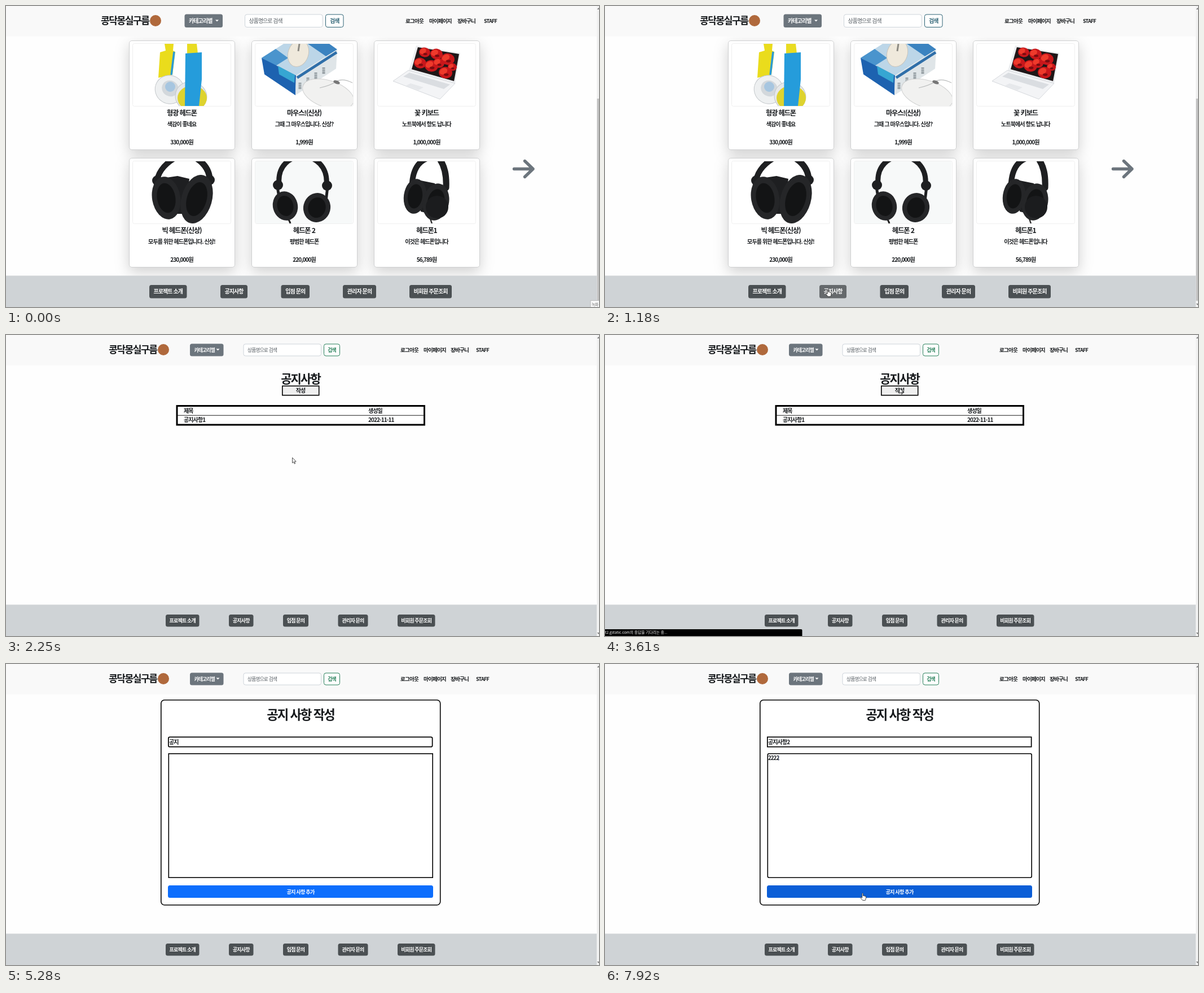
Write an HTML page that moves like this. It is 1051x533 px and loops after 8 s.

```html
<!DOCTYPE html>
<html lang="ko">
<head>
<meta charset="utf-8">
<title>공지사항</title>
<style>
  html, body { margin: 0; width: 100%; height: 100%; overflow: hidden; background: #fff; }
  svg { display: block; width: 100%; height: 100%; }
  text { font-family: "Noto Sans CJK KR", "Noto Sans CJK", sans-serif; letter-spacing: -.09em; white-space: pre; }
  .card { filter: drop-shadow(0 8px 12px rgba(0, 0, 0, .18)); }
</style>
</head>
<body>
<svg id="stage" viewBox="0 0 1051 533"></svg>
<script>
const LOOP = 8000;
const INK = '#16191c';

const rect = (x, y, x2, y2, fill, attrs = '') =>
  `<rect x="${x}" y="${y}" width="${x2 - x}" height="${y2 - y}" fill="${fill}" ${attrs}/>`;
const frame = (x, y, x2, y2, color, width, radius = 0, fill = '#fff', attrs = '') =>
  rect(x + width / 2, y + width / 2, x2 - width / 2, y2 - width / 2, fill,
    `stroke="${color}" stroke-width="${width}" rx="${radius}" ${attrs}`);
// cy is the middle of the glyphs
const label = (x, cy, size, str, { fill = INK, weight = 700, anchor = 'start', attrs = '' } = {}) =>
  `<text x="${x}" y="${cy + size * .37}" font-size="${size}" fill="${fill}" font-weight="${weight}" text-anchor="${anchor}" ${attrs}>${str}</text>`;
const centered = (x, cy, size, str, opts = {}) => label(x, cy, size, str, { anchor: 'middle', ...opts });
const poly = (points, fill, attrs = '') => `<polygon points="${points}" fill="${fill}" ${attrs}/>`;
const oval = (cx, cy, rx, ry, turn, fill, attrs = '') =>
  `<ellipse cx="${cx}" cy="${cy}" rx="${rx}" ry="${ry}" transform="rotate(${turn} ${cx} ${cy})" fill="${fill}" ${attrs}/>`;
const line = (d, color, width, attrs = '') =>
  `<path d="${d}" fill="none" stroke="${color}" stroke-width="${width}" ${attrs}/>`;
const group = (id, content, attrs = '') => `<g id="${id}" ${attrs}>${content}</g>`;

function header({ logoX, menu, field, button, nav, size, top, bottom, accent }) {
  const mid = 26.5;
  const links = ['로그아웃', '마이페이지', '장바구니', 'STAFF'];
  return rect(0, 0, 1047, 54, '#f9f9f9')
    + label(logoX, 26, 17.2, '콩닥몽실구름')
    + `<circle cx="${logoX + 97}" cy="26" r="10" fill="#b0693c"/>`
    + rect(menu[0], top, menu[1], bottom, '#6c757d', 'rx="3.5"')
    + label(menu[0] + 7.5, mid, size, '카테고리별', { fill: '#fff' })
    + poly(`${menu[1] - 13},24.5 ${menu[1] - 7},24.5 ${menu[1] - 10},27.5`, '#fff')
    + frame(field[0], top, field[1], bottom, '#ced4da', 1, 3.5)
    + label(field[0] + 7.5, mid, size - .1, '상품명으로 검색', { fill: '#555c62', weight: 400 })
    + frame(button[0], top, button[1], bottom, accent, 1, 3.5)
    + centered((button[0] + button[1]) / 2, mid, size, '검색', { fill: accent })
    + links.map((s, i) => label(nav[i], mid, i < 3 ? 9.6 : 9, s)).join('');
}

function footer(spans, top, bottom, size) {
  const names = ['프로젝트 소개', '공지사항', '입점 문의', '관리자 문의', '비회원 주문조회'];
  return rect(0, 477.5, 1047, 533, '#cfd3d6') + names.map((s, i) => {
    const [x, x2] = spans[i];
    return rect(x, top, x2, bottom, '#4b5053', `rx="3.5" class="link${i}"`)
      + centered((x + x2) / 2, (top + bottom) / 2, size, s, { fill: '#fff' });
  }).join('');
}

const band = (d, width = 8) => line(d, '#1e1f21', width, 'stroke-linecap="round"');
const cup = (x, y, rx, ry, turn) =>
  oval(x, y, rx, ry, turn, '#252628') + oval(x, y, rx * .65, ry * .7, turn, '#131415');
const joint = (x, y, r) => `<circle cx="${x}" cy="${y}" r="${r}" fill="#1e1f21"/>`;
const blossom = ([x, y, r]) => oval(x, y, r, r * .85, 10, '#c8171b')
  + oval(x - r * .3, y - r * .2, r * .6, r * .45, -30, '#ee3a2b') + oval(x + r * .1, y + r * .3, r * .35, r * .2, 0, '#7c0c10');

// Product pictures, drawn in stage coordinates
const pictures = [
  poly('281,67 297,67 296,79 300,81 295,122 270,127 273,82 283,79', '#eadc1c')
    + line('M298 81L293 122', '#2a9bd8', 3.5)
    + oval(290, 148, 26, 25, 30, '#eef0f1', 'stroke="#c3c7ca"')
    + oval(291, 146, 15, 14, 30, '#d3d8dc') + oval(291, 143, 9, 9, 0, '#a7c6e0')
    + poly('321,67 338,67 340,84 321,84', '#e9dc22')
    + oval(328, 160, 28, 26, 15, '#e6e8ea', 'stroke="#c3c7ca"') + oval(330, 163, 26, 22, 0, '#ded32e')
    + poly('318,84 347,82 347,130 342,177 317,177', '#259cdb'),
  poly('453,92 492,67 573,67 587,77 514,123', '#bcd6e8')
    + poly('453,92 478,76 500,92 478,106', '#4a94cd') + poly('535,67 573,67 587,77 567,89', '#3b83c0')
    + poly('453,92 514,123 513,158 458,121', '#1d62b0')
    + poly('482,106 512,122 511,136 484,121', '#36a6d2')
    + poly('514,123 587,77 585,111 513,158', '#dfe5e8')
    + line('M516 127L586 82', '#2f6fa9', 5)
    + [0, 1, 2, 3].map(i => line(`M${521 + i * 14} ${136 - i * 9}v11`, '#6b767d', 5, 'stroke-dasharray="1.200 1.200"')).join('')
    + oval(518, 84, 18, 24, 18, '#efe9dc', 'stroke="#c9c4ba"') + line('M520 67L518 80', '#8d8b84', 3)
    + oval(571, 156, 47, 24, 18, '#f1f1f0', 'stroke="#cfd0d0"')
    + line('M556 145Q574 141 585 134T614 136', '#b9bbbb', 1.2) + oval(586, 135, 6, 3, 20, '#777'),
  poly('727,70 805,83 796,137 714,114', '#eceef0')
    + poly('730,73 803,85 794,133 719,112', '#1f1718')
    + [[742, 82, 10], [763, 85, 11], [783, 94, 12], [734, 101, 11], [754, 106, 12], [779, 118, 12], [767, 101, 10], [791, 108, 8]]
      .map(blossom).join('')
    + poly('713,114 796,137 769,165 686,133', '#f3f4f6', 'stroke="#d5d8dc"')
    + poly('715,118 787,139 776,147 704,125', '#dadde1') + poly('717,137 740,144 731,149 709,141', '#e6e8eb'),
  band('M268 312C268 298 278 282 298 270', 10) + band('M338 270C353 280 362 294 361 312', 11)
    + joint(268, 309, 9) + joint(361, 308, 9)
    + poly('284,304 304,301 325,306 318,368 296,368', '#1e1f21')
    + cup(284, 340, 25, 38, -10) + cup(338, 342, 27, 44, 16),
  rect(442, 274, 614, 386, '#f7f9f9') + band('M484 315C478 250 574 250 568 318', 9)
    + joint(482, 317, 9) + joint(569, 318, 9)
    + band('M481 320L485 345M570 320L567 345', 5) + line('M497 375Q503 379 504 386', '#222', 3)
    + cup(495, 354, 22, 26, -14) + cup(551, 357, 24, 26, 14),
  band('M720 312C722 290 730 276 746 270', 10) + band('M768 270C778 284 781 300 780 322', 11)
    + line('M738 355Q752 372 755 386', '#333', 2.5)
    + poly('730,308 760,314 760,370 735,364', '#1e1f21')
    + cup(725, 337, 20, 31, 8) + cup(762, 347, 23, 33, 12) + oval(764, 356, 20, 20, 0, '#1b1c1e'),
];

const products = [
  ['형광 헤드폰', '색감이 좋네요', '330,000원'],
  ['마우스!(신상)', '그때 그 마우스입니다. 신상?', '1,999원'],
  ['꽃 키보드', '노트북에서 향도 납니다', '1,000,000원'],
  ['빅 헤드폰(신상)', '모두를 위한 헤드폰입니다. 신상!', '230,000원'],
  ['헤드폰 2', '평범한 헤드폰', '220,000원'],
  ['헤드폰1', '이것은 헤드폰입니다', '56,789원'],
];

function card([title, note, price], i) {
  const x = 218 + i % 3 * 217, y = i < 3 ? 61 : 269, mid = x + 93.5;
  return frame(x, y, x + 188, y + 194, '#cfd0d1', 1, 4.5, '#fff', 'class="card"')
    + `<clipPath id="clip${i}">${rect(x + 7, y + 6, x + 180, y + 116, '#fff', 'rx="3"')}</clipPath>`
    + `<g clip-path="url(#clip${i})">${pictures[i]}</g>`
    + frame(x + 6, y + 5, x + 181, y + 117, '#efefef', 1, 3, 'none')
    + centered(mid, y + 128.5, 12.2, title)
    + centered(mid, y + 148, 10, note)
    + centered(mid, y + 180.5, 10, price);
}

const shop = group('shop',
  products.map(card).join('')
  + line('M900.500 288.500H934M919.500 274.500L934 288.500L919.500 302.500', '#6c757d', 5.4, 'stroke-linecap="round" stroke-linejoin="round"')
  + header({ logoX: 168, menu: [316.5, 384], field: [423, 561.5], button: [566, 598.5],
    nav: [708, 750, 800, 847], size: 10, top: 14.5, bottom: 38, accent: '#2c6274' })
  + footer([[254, 320.5], [380, 428], [487.5, 538], [597, 656], [715, 790]], 494, 517.5, 10)
  + rect(1047.500, 164, 1051, 522, '#c1c1c1'));

const site = group('site',
  header({ logoX: 182, menu: [326, 385.5], field: [420.5, 559], button: [563, 592],
    nav: [699, 740, 788, 833], size: 8.8, top: 15.5, bottom: 37.5, accent: '#27805a' })
  + footer([[283, 342.5], [395, 438.5], [491, 536], [588.5, 641.5], [694, 760.5]], 495, 516.5, 9));

const list = group('list',
  centered(522, 77, 21, '공지사항')
  + frame(489, 89.5, 555.5, 107.5, '#000', 1.6, 0, '#efefef')
  + centered(522, 98.5, 10, '작성')
  + frame(301.5, 124, 743, 160.5, '#000', 3)
  + line('M304 142.300H741', '#222', 1)
  + label(315, 134, 10, '제목') + label(642, 134, 10, '생성일')
  + label(315, 150, 10, '공지사항1') + label(642, 150, 10, '2022-11-11'));

const form = group('form',
  frame(274, 63, 770.5, 427.5, '#000', 1.6, 6)
  + centered(522, 90, 22.3, '공지 사항 작성')
  + frame(287, 128.5, 756.5, 147.5, '#000', 1.7, 0, '#fff', 'id="titleBox"')
  + label(289, 138, 10, '', { attrs: 'id="titleText"' })
  + frame(287.5, 158, 757, 379, '#000', 1.6, 0, '#fff', 'id="bodyBox"')
  + label(289, 166.5, 9.6, '', { attrs: 'id="bodyText"' })
  + rect(0, 162, .8, 171, '#4a5a80', 'id="caret"')
  + rect(287, 392, 757, 414, '#0d6efd', 'id="submit" rx="3.5"')
  + centered(522, 403.5, 9.2, '공지 사항 추가', { fill: '#fff' }));

const scrollbar = rect(1047, 0, 1051, 533, '#f1f1f1')
  + poly('1047.5,6 1051,3 1051,6', '#777') + poly('1047.5,527 1051,527 1051,530', '#777');

const status = group('status', rect(-3, 521, 349.5, 536, '#000', 'rx="2"'))
  + label(0, 527, 6.7, 't2.gstatic.com의 응답을 기다리는 중...',
    { fill: '#fff', weight: 400, attrs: 'id="statusText" style="letter-spacing:0"' });

const hint = group('hint', frame(1035.5, 521, 1056, 536, '#bbb', 1, 0, '#f8f8f8')
  + label(1038, 528.5, 7, '녹화', { fill: '#777', weight: 400 }));

const outline = (id, d) =>
  `<path id="${id}" d="${d}" fill="#fff" stroke="#222" stroke-width=".8" stroke-linejoin="round"/>`;
const pointer = group('pointer',
  outline('arrow', 'M0 0V9.500L2.200 7.500L3.700 11L5.100 10.400L3.600 7H6.600Z')
  + outline('hand', 'M1.200 1Q2 -.3 2.900 1V5Q4 4.200 4.700 5.300Q5.800 4.700 6.400 5.800Q7.900 5.300 8 7V9.500L6.800 13H2.200L-1.700 8.500Q-1.500 6.800 .3 7.900L1.200 8.500Z')
  + line('M-2.500 -4H2.500M0 -4V4M-2.500 4H2.500', '#444', 1, 'id="beam"'));

document.getElementById('stage').innerHTML = rect(0, 0, 1051, 533, '#fefefe')
  + scrollbar + shop + site + list + form + status + hint + pointer;

const el = id => document.getElementById(id);
const show = (id, on) => el(id).setAttribute('display', on ? 'inline' : 'none');

// time, x, y, shape until the next key
const pointerKeys = [
  [0, 1042, 526, 'none'], [70, 1042, 526, 'arrow'], [350, 800, 472, 'arrow'], [550, 600, 460, 'arrow'],
  [700, 440, 474, 'arrow'], [830, 363, 500, 'arrow'], [970, 363, 500, 'arrow'], [1040, 381, 501, 'hand'],
  [1180, 393, 501.5, 'hand'], [1770, 393, 501.5, 'arrow'], [2110, 393, 501.5, 'arrow'], [2250, 507.5, 217.5, 'arrow'],
  [2500, 523, 120, 'arrow'], [2860, 522, 86, 'arrow'], [2930, 522, 86, 'arrow'], [3280, 522, 94, 'arrow'],
  [3680, 522, 94, 'arrow'], [4080, 503, 126, 'beam'], [4150, 500.5, 130.5, 'beam'], [4290, 520, 138, 'beam'],
  [4360, 520, 138, 'none'], [6800, 596.5, 115, 'arrow'], [6880, 596.5, 115, 'arrow'], [7010, 500, 160, 'beam'],
  [7150, 430, 215, 'beam'], [7360, 430, 215, 'none'], [7640, 440, 230, 'beam'], [7780, 449, 360, 'arrow'],
  [7850, 452, 394, 'hand'], [7920, 454.5, 405.5, 'hand'], [LOOP, 454.5, 405.5, 'hand'],
];
const titleKeys = [[0, ''], [4490, 'ㄱ'], [4890, '고'], [5010, '공'], [5150, '공ㅈ'], [5280, '공지'], [5610, '공지ㅅ'],
  [5810, '공지사'], [5910, '공지사하'], [6010, '공지사항'], [6280, '공지사항2']];

const lastKey = (keys, t) => keys.findLastIndex(key => key[0] <= t);

function placePointer(t) {
  const i = Math.min(lastKey(pointerKeys, t), pointerKeys.length - 2);
  const [t0, x0, y0, shape] = pointerKeys[i], [t1, x1, y1] = pointerKeys[i + 1];
  const k = (t - t0) / (t1 - t0);
  el('pointer').setAttribute('transform', `translate(${x0 + (x1 - x0) * k} ${y0 + (y1 - y0) * k})`);
  for (const name of ['arrow', 'hand', 'beam']) show(name, name === shape);
}

function render(t) {
  const onShop = t < 1770, onForm = t >= 3680, inBody = t >= 7220;
  show('shop', onShop);
  show('site', !onShop);
  show('list', !onShop && !onForm);
  show('form', onForm);
  show('hint', t < 70);
  document.querySelector('#shop .link1').setAttribute('fill', t >= 1040 ? '#65696c' : '#4b5053');

  const waiting = t >= 3210 && t < 4220;
  show('status', waiting);
  show('statusText', waiting);
  el('status').setAttribute('opacity', Math.max(0, Math.min(1, (4220 - t) / 140)));

  const digits = Math.max(0, Math.min(4, Math.floor((t - 7290) / 70)));
  el('titleText').textContent = titleKeys[lastKey(titleKeys, t)][1];
  el('bodyText').textContent = '2'.repeat(digits);
  el('titleBox').setAttribute('rx', t >= 4290 && !inBody ? 2.5 : 0);
  el('bodyBox').setAttribute('rx', inBody ? 2.5 : 0);
  show('caret', inBody);
  el('caret').setAttribute('x', 289 + digits * 4.6);
  el('submit').setAttribute('fill', t >= 7850 ? '#0b5ed7' : '#0d6efd');
  placePointer(t);
}

const start = performance.now();
function tick() {
  render((performance.now() - start) % LOOP);
  requestAnimationFrame(tick);
}
tick();
</script>
</body>
</html>
```
